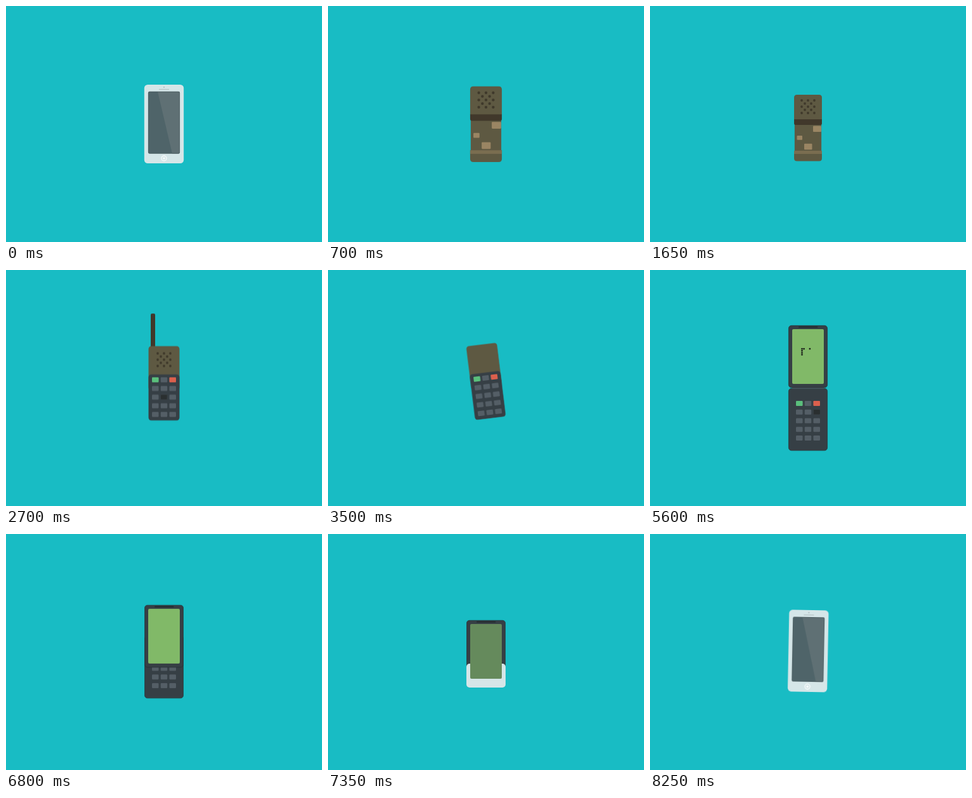
Write an HTML page without scripts that moves like this. It is 500x375 px and loops after 8.3 s.

```html
<!DOCTYPE html>
<html lang="en">
<head>
<meta charset="utf-8">
<title>Phone evolution</title>
<style>
@property --fold { syntax: "<angle>"; inherits: true; initial-value: 0deg; }

html, body { margin: 0; width: 100%; height: 100%; overflow: hidden; background: #18bcc4; }
.stage { position: relative; width: 100%; height: 100%; overflow: clip; contain: strict; }
.layer { position: absolute; left: 0; top: 0; width: 500px; height: 375px; overflow: visible; }
.defs { position: absolute; left: 0; top: 0; width: 0; height: 0; overflow: hidden; }

.white { fill: #d5e6e8; }
.dark { fill: #363f45; }
.brown { fill: #5e5942; }
.lcd { fill: #81b968; }
.press { fill: #2a2f30; }

/* Tall touch phone: folds down over its lower edge */
.tall { transform-origin: 250px 250px; animation: tall-show 8.3s step-end infinite, tall-fold 8.3s linear infinite; }
.face { animation: face 8.3s step-end infinite; }
.wiggle { transform-origin: 250px 250px; animation: wiggle 8.3s step-end infinite; }
@keyframes tall-show { 0% { opacity: 1 } 8.43% { opacity: 0 } 98.19%, 100% { opacity: 1 } }
@keyframes face { 0% { opacity: 1 } 7.22% { opacity: 0 } 8.43%, 100% { opacity: 1 } }
@keyframes tall-fold {
  0%, 5.42% { transform: perspective(311px) rotateX(0deg) }
  6.02% { transform: perspective(311px) rotateX(-22deg) }
  6.62% { transform: perspective(311px) rotateX(-65deg) }
  7.22% { transform: perspective(311px) rotateX(-112deg) }
  7.83%, 8.43% { transform: perspective(311px) rotateX(-135deg) }
  8.5%, 100% { transform: perspective(311px) rotateX(0deg) }
}
@keyframes wiggle {
  0% { transform: none }
  98.19% { transform: rotate(3deg) scale(1, .98) }
  98.79% { transform: translate(-1px, 1px) rotate(2deg) scale(1.01, 1.03) }
  99.39%, 100% { transform: translate(-1px, .8px) rotate(1.1deg) scale(1, 1.04) }
}

/* Field radio */
.radio { transform-origin: 250px 193.5px; animation: radio-show 8.3s step-end infinite, radio-move 8.3s ease-in-out infinite; }
@keyframes radio-show { 0% { opacity: 0 } 6.02% { opacity: 1 } 20.48%, 100% { opacity: 0 } }
@keyframes radio-move {
  0%, 14.45% { transform: translateY(-6px) scale(1.14) }
  16.86% { transform: translateY(3px) scale(1.1, 1.02) }
  19.87%, 100% { transform: none }
}

/* Brick phone that turns into a bar phone */
.bar { transform-origin: 250px 187.5px; animation: bar-show 8.3s step-end infinite, bar-move 8.3s ease-in-out infinite; }
.aerial { transform-origin: 232px 130px; animation: aerial 8.3s ease-out infinite; }
.grille { animation: grille 8.3s linear infinite; }
.cap { animation: cap 8.3s linear infinite; }
.strip { transform-origin: 250px 152px; animation: strip 8.3s ease-out infinite; }
.dial { animation: dial 8.3s step-end infinite; }
@keyframes bar-show { 0% { opacity: 0 } 20.48% { opacity: 1 } 56.02%, 100% { opacity: 0 } }
@keyframes bar-move {
  0%, 20.48% { transform: translate(0, 5px) rotate(0deg) scale(.91) }
  22.28% { transform: translate(0, -8px) rotate(0deg) scale(1.03) }
  22.89%, 39.15% { transform: translate(0, -7.5px) rotate(0deg) scale(1) }
  42.16%, 42.77% { transform: translate(0, -10.5px) rotate(-7deg) scale(1) }
  45.18% { transform: translate(2px, 6px) rotate(13deg) scale(1) }
  47.5% { transform: translate(0, 1px) rotate(-3deg) scale(1) }
  48.79%, 100% { transform: translate(0, 0) rotate(0deg) scale(1) }
}
@keyframes aerial { 0%, 20.9% { transform: scaleY(0) } 22.89%, 39.15% { transform: scaleY(1) } 41.5%, 100% { transform: scaleY(0) } }
@keyframes grille { 0%, 39.15% { opacity: 1 } 41.5%, 100% { opacity: 0 } }
@keyframes cap { 0%, 42.77% { fill: #5e5942 } 45.8%, 100% { fill: #363f45 } }
@keyframes strip { 0%, 45.8% { transform: scale(0) } 48.19%, 100% { transform: scale(1) } }
@keyframes dial {
  0% { opacity: 0; transform: none }
  28.91% { opacity: 1; transform: translate(0, 13.75px) }
  29.51% { opacity: 0 }
  30.12% { opacity: 1; transform: translate(27.5px, 27.5px) }
  30.72% { opacity: 0 }
  31.32% { opacity: 1; transform: translate(13.75px, 55px) }
  31.92% { opacity: 0 }
  32.53% { opacity: 1; transform: translate(13.75px, 27.5px) }
  33.13% { opacity: 0 }
  48.79% { opacity: 1; transform: none }
  49.39% { opacity: 1; transform: translate(13.75px, 55px) }
  50%, 100% { opacity: 0; transform: none }
}

/* Clamshell */
.clam { transform-origin: 250px 187.5px; animation: clam-show 8.3s step-end infinite, clam-move 8.3s linear infinite; }
.lid { transform-origin: 250px 187.5px; backface-visibility: hidden; }
.outer { transform: perspective(295px) rotateX(var(--fold)); }
.inner { transform: perspective(295px) rotateX(calc(var(--fold) - 180deg)); }
@keyframes clam-show { 0% { opacity: 0 } 56.02% { opacity: 1 } 79.51%, 100% { opacity: 0 } }
@keyframes clam-move {
  0%, 56.02% { --fold: 4deg; transform: translate(0, -50px) rotate(0deg) }
  57.22% { --fold: 38deg; transform: translate(1px, -53px) rotate(1deg) }
  57.83%, 58.42% { --fold: 63deg; transform: translate(2px, -53.2px) rotate(1.6deg) }
  58.43% { --fold: 88deg; transform: translate(2px, -48px) rotate(1.6deg) }
  59.63% { --fold: 140deg; transform: translate(1px, -18px) rotate(1deg) }
  60.84% { --fold: 174deg; transform: translate(0, -2px) rotate(0deg) }
  61.44%, 100% { --fold: 180deg; transform: translate(0, 0) rotate(0deg) }
}

/* Snake game */
.snake {
  fill: none; stroke: #20281e; stroke-width: 2.5;
  stroke-dasharray: 2.5 .6 2.5 .6 2.5 .6 2.5 .6 2.5 400;
  animation: snake 8.3s linear infinite;
}
.food { fill: #20281e; animation: food 8.3s step-end infinite; }
.steer { animation: steer 8.3s step-end infinite; }
@keyframes snake {
  0% { stroke-dashoffset: 0 }
  66.86% { stroke-dashoffset: 0; animation-timing-function: steps(11, jump-end) }
  73.49%, 100% { stroke-dashoffset: -34.1px }
}
@keyframes food { 0% { opacity: 1 } 69.27%, 100% { opacity: 0 } }
@keyframes steer {
  0% { opacity: 0; transform: none }
  67.46% { opacity: 1; transform: none }
  68.07% { opacity: 0 }
  71.08% { opacity: 1; transform: translate(-13.75px, 13.75px) }
  71.68%, 100% { opacity: 0; transform: none }
}

/* Clamshell that slides together into a short touch phone */
.slide { animation: slide-show 8.3s step-end infinite; }
.base { animation: base 8.3s ease-in-out infinite; }
.top { animation: top 8.3s ease-in-out infinite; }
.glass { animation: glass 8.3s linear infinite; }
.rise { animation: rise 8.3s linear infinite; }
.trim { animation: trim 8.3s linear infinite; }
@keyframes slide-show { 0% { opacity: 0 } 79.51% { opacity: 1 } 98.19%, 100% { opacity: 0 } }
@keyframes base {
  0%, 79.51% { transform: none; opacity: 1 }
  84.33% { transform: translateY(-51.5px); opacity: 1 }
  84.4%, 100% { transform: translateY(-51.5px); opacity: 0 }
}
@keyframes top { 0%, 79.51% { transform: none } 84.33%, 100% { transform: translateY(49px) } }
@keyframes glass { 0%, 84.33% { fill: #81b968 } 88.55%, 89.15% { fill: #658a5c } 92.16%, 100% { fill: #4f6469 } }
@keyframes rise {
  0%, 86.13% { y: 236px; height: 0 }
  86.74% { y: 229px; height: 15px }
  88.55%, 89.15% { y: 206px; height: 38px }
  92.16%, 100% { y: 131.5px; height: 112.5px }
}
@keyframes trim { 0%, 90.3% { opacity: 0 } 92.16%, 100% { opacity: 1 } }
</style>
</head>
<body>
<div class="stage">
<svg class="defs">
  <defs>
    <rect id="key" width="10.5" height="8" rx="1.2"/>
    <g id="row">
      <use href="#key"/><use href="#key" x="13.75"/><use href="#key" x="27.5"/>
    </g>
    <g id="pad">
      <g fill="#545e66">
        <use href="#row"/><use href="#row" y="13.75"/><use href="#row" y="27.5"/>
        <use href="#row" y="41.25"/><use href="#row" y="55"/>
      </g>
      <use href="#key" fill="#5abf7c"/>
      <use href="#key" x="27.5" fill="#dc604d"/>
    </g>
    <g id="pair"><circle r="1.9"/><circle cx="10" r="1.9"/></g>
    <g id="trio"><use href="#pair"/><circle cx="20" r="1.9"/></g>
    <g id="holes" fill="#3f392b">
      <use href="#trio"/><use href="#pair" x="5" y="5"/><use href="#trio" y="10"/>
      <use href="#pair" x="5" y="15"/><use href="#trio" y="20"/>
    </g>
    <rect id="shell" x="219.4" width="61.2" height="98.6" rx="4.5" fill="#363f45" stroke="#2b3338" stroke-width=".8"/>
    <g id="lower">
      <use href="#shell" y="188.2"/>
      <path d="M225 187.6H275" stroke="#545e66" stroke-width="2"/>
      <use href="#pad" x="231" y="208"/>
    </g>
    <g id="upper">
      <use href="#shell" y="88.3"/>
      <path d="M236 90.7H264.5" stroke="#22292d" stroke-width="1.8" stroke-linecap="round"/>
    </g>
    <g id="home">
      <circle r="4" fill="none" stroke="#f7fbfb" stroke-width="1.3"/>
      <circle r="1.8" fill="#f7fbfb"/>
    </g>
    <g id="ear">
      <circle r="1.1" fill="#b0bdc0"/>
      <path d="M-8 3.5H8" stroke="#b6c4c6" stroke-width="1.2"/>
    </g>
  </defs>
</svg>

<svg class="layer radio">
  <rect class="brown" x="228.8" y="186" width="42.4" height="48"/>
  <g fill="#9a8563">
    <rect x="258" y="190.5" width="13" height="9.5" rx="1"/>
    <rect x="232.5" y="206" width="8.5" height="6.8" rx="1"/>
    <rect x="244" y="218.8" width="12.5" height="9.5" rx="1"/>
  </g>
  <path class="brown" d="M228 230H272V242Q272 246.5 267.5 246.5H232.5Q228 246.5 228 242Z"/>
  <path d="M228 230H272V235H228Z" fill="#7a6d50"/>
  <path class="brown" d="M228 181V145.5Q228 141 232.5 141H267.5Q272 141 272 145.5V181Z"/>
  <path d="M228 180H272V186.5Q272 189 269.5 189H230.5Q228 189 228 186.5Z" fill="#41382b"/>
  <use href="#holes" x="240" y="150"/>
</svg>

<svg class="layer">
  <g class="bar">
    <rect class="aerial" x="229" y="76.5" width="7" height="56" rx="2.5" fill="#41382b"/>
    <rect class="cap" x="225.5" y="128.5" width="49" height="70" rx="4.5"/>
    <use class="grille" href="#holes" x="240" y="140"/>
    <rect class="strip lcd" x="230.5" y="140" width="39" height="24" rx="2"/>
    <rect class="dark" x="225.5" y="173.5" width="49" height="73" rx="4.5"/>
    <use href="#pad" x="231" y="178"/>
    <g class="dial press"><use href="#key" x="231" y="178"/></g>
  </g>
</svg>

<div class="layer clam">
  <svg class="layer">
    <use href="#lower"/>
    <g class="steer press"><use href="#key" x="258.5" y="221.75"/></g>
  </svg>
  <svg class="layer lid outer">
    <use href="#shell" y="188"/>
    <path d="M223 285.8H277" stroke="#505a60" stroke-width="2.5"/>
    <rect class="lcd" x="228.2" y="226.5" width="43.6" height="20" rx="3"/>
  </svg>
  <svg class="layer lid inner">
    <use href="#upper"/>
    <rect class="lcd" x="225" y="94" width="50" height="87" rx="2"/>
    <path class="snake" d="M240.5 138.85V125.2H259.1V150"/>
    <rect class="food" x="251.65" y="123.95" width="2.5" height="2.5"/>
  </svg>
</div>

<svg class="layer slide">
  <use class="base" href="#lower"/>
  <use class="top" href="#upper"/>
  <rect class="rise white" x="219" width="62" rx="5"/>
  <g class="top"><rect class="glass" x="225" y="94" width="50" height="87" rx="2"/></g>
  <g class="trim">
    <path d="M239 143H275V230H261Z" fill="#5f7074"/>
    <use href="#ear" x="250" y="135"/>
    <use href="#home" transform="translate(250 236.8) scale(.8)"/>
  </g>
</svg>

<svg class="layer tall">
  <g class="wiggle">
    <rect class="white" x="218.8" y="125" width="62.4" height="125" rx="5.5"/>
    <g class="face">
      <rect x="225" y="136" width="50" height="98.5" rx="2" fill="#4f6469"/>
      <path d="M240 136H273Q275 136 275 138V232.5Q275 234.5 273 234.5H263Z" fill="#5f7074"/>
      <rect x="225.3" y="136.2" width="49.4" height="98" rx="2" fill="none" stroke="#48595e" stroke-width=".7"/>
      <use href="#ear" x="250" y="129"/>
      <use href="#home" x="250" y="242"/>
    </g>
  </g>
</svg>
</div>
</body>
</html>
```
